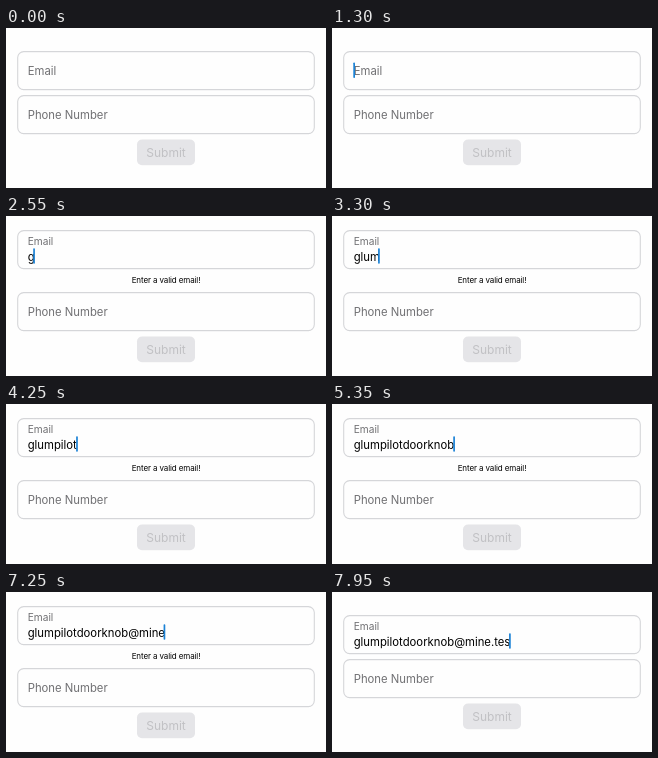
An HTML page for the animation above (8000 ms loop, 320 by 160 pixels).

```html
<!DOCTYPE html>
<html lang="en">
<head>
<meta charset="utf-8">
<title>Form validation</title>
<style>
  html, body { margin: 0; width: 100%; height: 100%; overflow: hidden; background: #fefefe; }
  svg { display: block; width: 100vw; height: 100vh; }
  text { font-family: Inter, "Open Sans", sans-serif; font-size: 11.3px; white-space: pre; }
  .field { fill: #fefefe; stroke: #d5d6d9; stroke-width: 1.1; }
  .label { fill: #707073; }
  .error { font-size: 8px; letter-spacing: -.12px; }
  .submit { font-size: 12px; fill: #c1c1c4; }
</style>
</head>
<body>
<svg viewBox="0 0 320 160">
  <rect width="320" height="160" fill="#fefefe"/>
  <g id="email">
    <rect class="field" x="11.7" y="23.6" width="296.6" height="38" rx="6"/>
    <text id="label" class="label">Email</text>
    <text id="value" x="21.7" y="53.8"></text>
    <rect id="caret" width="1.7" height="15.6" rx=".8" fill="#1b82d6"/>
  </g>
  <text id="error" class="error" x="160" y="66.6" text-anchor="middle">Enter a valid email!</text>
  <g id="rest">
    <rect class="field" x="11.7" y="67.6" width="296.6" height="38" rx="6"/>
    <text class="label" x="21.7" y="91">Phone Number</text>
    <rect x="131" y="111.5" width="58" height="25.7" rx="5" fill="#e5e5e8"/>
    <text class="submit" x="160" y="128.8" text-anchor="middle">Submit</text>
  </g>
</svg>
<script>
const LOOP = 8000, FOCUS = 1300, FLOAT = 1450, VALID = 7950, LEFT = 21.7;
const TYPED = "glumpilotdoorknob@mine.tes";
const KEY_TIMES = [
  2550, 2850, 3050, 3300, 3450, 3650, 3850, 4000, 4200, 4350, 4500, 4700, 4850,
  4950, 5050, 5200, 5300, 5700, 6600, 6900, 7100, 7250, 7350, 7600, 7800, 7950
];
const BLINKS = [2100, 6350];

const el = id => document.getElementById(id);
const [email, label, value, caret, error, rest] =
  ["email", "label", "value", "caret", "error", "rest"].map(el);
const clamp = x => Math.max(0, Math.min(1, x));
const mix = (a, b, p) => a + (b - a) * p;
const smooth = p => p * p * (3 - 2 * p);

function widthOf(count) {
  value.textContent = TYPED.slice(0, count);
  return count ? value.getComputedTextLength() : 0;
}

function caretOpacity(t, lastKey) {
  if (t < FOCUS) return 0;
  const blink = BLINKS.find(b => t >= b && b > lastKey);
  return blink === undefined ? 1 : 1 - clamp((t - blink + 50) / 300);
}

function draw(t) {
  const count = KEY_TIMES.filter(k => k <= t).length;
  const lastKey = count ? KEY_TIMES[count - 1] : 0;
  const invalid = count > 0 && t < VALID;
  const shift = invalid ? 9 : 0;
  email.setAttribute("transform", `translate(0 ${-shift})`);
  rest.setAttribute("transform", `translate(0 ${shift})`);
  error.setAttribute("visibility", invalid ? "visible" : "hidden");

  const raise = smooth(clamp((t - FLOAT + 50) / 400));
  label.setAttribute("transform",
    `translate(${LEFT} ${mix(47, 38, raise)}) scale(${mix(1, .9, raise)})`);

  // The caret glides the last part of the way after each key.
  const before = widthOf(Math.max(0, count - 1));
  const glide = mix(.85, 1, clamp((t - lastKey) / 100));
  caret.setAttribute("x", LEFT - .4 + mix(before, widthOf(count), glide));
  caret.setAttribute("y", mix(34.5, 41.2, raise));
  caret.setAttribute("opacity", caretOpacity(t, lastKey));
}

const start = performance.now();
function tick() {
  draw((performance.now() - start) % LOOP);
  requestAnimationFrame(tick);
}
tick();
</script>
</body>
</html>
```
